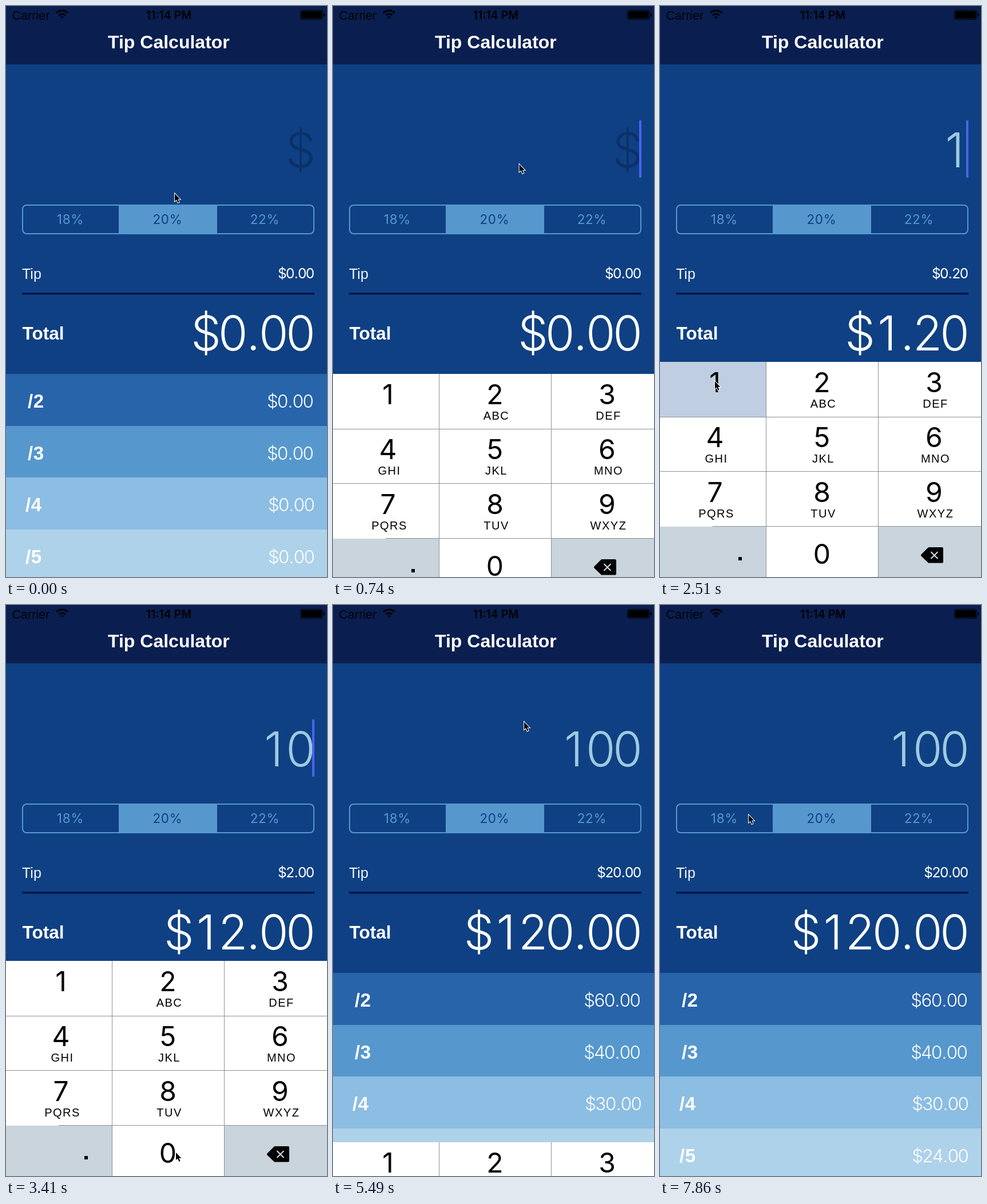
An HTML page with a canvas that plays this animation: 561x998 px, repeating every 8 s.

```html
<!DOCTYPE html>
<html lang="en">
<head>
<meta charset="utf-8">
<title>Tip Calculator</title>
<style>
  html, body { margin: 0; width: 100%; height: 100%; overflow: hidden; background: #0f4083; }
  canvas { display: block; }
</style>
</head>
<body>
<canvas id="stage" width="561" height="998"></canvas>
<script>
const ctx = document.getElementById('stage').getContext('2d');
const LOOP = 8000, STEP = 148.15;
const SANS = '"Liberation Sans", Arial, sans-serif';
const LIGHT = 'Inter, Roboto, sans-serif';
const NAVY = '#0a1f50', BLUE = '#0f4083', SKY = '#5698ce', GREY = '#c9d4dc';
const ROWS = ['#2864aa', SKY, '#8cbde3', '#aed2ea'];
const LETTERS = ',ABC,DEF,GHI,JKL,MNO,PQRS,TUV,WXYZ'.split(',');
const KEY_X = [96, 283, 479], KEY_W = 196, KEY_H = 96;
const KEYBOARD_TOP = 622, KEYBOARD_H = 376;
const SHOW = 358, FOCUS = 440, HIDE = 5200, PRESS = 150;

const TAPS = [
  { digit: 1, down: 2450, typed: 2450 },
  { digit: 0, down: 2950, typed: 3100 },
  { digit: 0, down: 3250, typed: 3550 }
];

// Where the pointer turns or rests: [time, x, y]
const STOPS = [
  [0, 295, 328], [592, 326, 273], [1332, 323, 310], [2368, 96, 656],
  [2516, 96, 656], [2960, 297, 957], [3700, 297, 957], [4588, 343, 435],
  [5330, 340, 155], [6068, 282, 641], [7104, 270, 842], [7844, 155, 367]
];
const SWIRL = 6068, SWIRL_END = 7104;

const clamp = v => Math.min(1, Math.max(0, v));
const smooth = k => k * k * (3 - 2 * k);
const mix = (a, b, k) => a + (b - a) * k;

// Share of a keyboard slide done after some ms
function settle(ms) {
  const x = Math.max(0, ms) * 0.012;
  return 1 - (1 + x) * Math.exp(-x);
}

function rect(x, y, w, h, color) {
  ctx.fillStyle = color;
  ctx.fillRect(x, y, w, h);
}

function outline(path, color, width) {
  ctx.strokeStyle = color;
  ctx.lineWidth = width;
  ctx.stroke(path);
}

function text(str, x, y, font, color, align = 'left', spacing = 0) {
  ctx.font = font;
  ctx.fillStyle = color;
  ctx.textAlign = align;
  ctx.letterSpacing = spacing + 'px';
  ctx.fillText(str, x, y);
}

// Light figures in even columns, set from the right edge
function figures(str, right, y, em, weight, color) {
  for (const ch of [...str].reverse()) {
    const w = em * (ch === '.' ? 0.278 : 0.556);
    text(ch, right - w / 2, y, `${weight} ${em * 0.98}px ${LIGHT}`, color, 'center');
    right -= w;
  }
}

function money(value, ...place) {
  figures('$' + value.toFixed(2), ...place);
}

function header() {
  rect(0, 0, 561, 102, NAVY);
  text('Carrier', 10.5, 23.5, `21.5px ${SANS}`, '#000');
  text('11:14 PM', 284.5, 23, `600 19.5px ${LIGHT}`, '#000', 'center');
  text('Tip Calculator', 178, 74, `bold 32px ${SANS}`, '#fff');

  for (const r of [2.5, 8, 14]) {
    const arc = new Path2D();
    arc.arc(98, 22, r, -Math.PI * 0.75, -Math.PI * 0.25);
    outline(arc, '#000', 3);
  }
  const battery = new Path2D();
  battery.roundRect(514.5, 7.5, 39, 16, 3);
  outline(battery, '#000', 1);
  rect(516, 9, 36, 13, '#000');
  rect(555, 13, 2, 5, '#000');
}

function segments() {
  rect(197, 348, 172, 50, SKY);
  const frame = new Path2D();
  frame.roundRect(29, 348, 509, 50, 7);
  outline(frame, SKY, 2);
  ['18%', '20%', '22%'].forEach((label, i) =>
    text(label, 112.5 + i * 170, 381, `22.5px ${LIGHT}`, i === 1 ? BLUE : SKY, 'center', 0.7));
}

function bill(typed, caret) {
  const amount = Number(typed), tip = amount * 0.2, total = amount + tip;
  figures(typed || '$', 538.5, 282, 85, 300, typed ? '#9ecae1' : '#0b3169');
  if (caret) rect(535, 200, 4, 100, '#4a63ee');
  segments();
  text('Tip', 28, 477, `25px ${SANS}`, '#f4f8fc');
  money(tip, 538.5, 476, 25, 400, '#fff');
  rect(28, 501, 511, 3.5, '#05164a');
  text('Total', 28.5, 583, `bold 31.5px ${SANS}`, '#fff');
  money(total, 538.5, 602, 85, 300, '#fff');
  ROWS.forEach((color, i) => {
    const y = Math.round(643 + i * 90.5), shift = i > 1 ? 1 : 0;
    rect(0, y, 561, 91, color);
    text('/' + (i + 2), 38 - shift * 4, y + 59, `bold 33px ${SANS}`, '#fff', 'left', 0.5);
    money(total / (i + 2), 537 + shift * 2, y + 59, 32, 300, '#fff');
  });
}

function backspace() {
  const key = new Path2D('M458 338L470 326H493V349.5H470Z');
  ctx.lineJoin = 'round';
  ctx.fillStyle = '#000';
  ctx.fill(key);
  outline(key, '#000', 4);
  outline(new Path2D('M473.5 332l12 12m0-12l-12 12'), GREY, 2.2);
}

function keyboard(tap) {
  const line = '#8d9195', digitFont = `48px ${LIGHT}`;
  rect(0, 0, 561, KEYBOARD_H, '#fff');
  rect(0, 288, 186, 88, GREY);
  rect(381, 288, 180, 88, GREY);
  if (tap) {
    const cell = (tap.digit + 10) % 11;
    rect(cell % 3 * KEY_W - 10, Math.floor(cell / 3) * KEY_H, KEY_W, KEY_H, '#c0cee2');
  }
  for (const x of [185, 381]) rect(x, 0, 1, KEYBOARD_H, line);
  for (const y of [96, 191]) rect(0, y, 561, 1, line);
  rect(92, 287, 469, 1, line);

  LETTERS.forEach((letters, i) => {
    const x = KEY_X[i % 3], y = Math.floor(i / 3) * KEY_H;
    text(i + 1, x, y + 53, digitFont, '#000', 'center');
    text(letters, x + 2.5, y + 80, `20px ${SANS}`, '#000', 'center', 1.5);
  });
  text('0', KEY_X[1], 353, digitFont, '#000', 'center');
  rect(137, 341, 6, 6, '#000');
  backspace();
}

function pointer(t) {
  const next = STOPS.findIndex(stop => stop[0] > t);
  const b = STOPS.at(next), a = STOPS.at(next - 1);
  const k = next < 0 ? 1 : smooth((t - a[0]) / (b[0] - a[0]));
  const p = clamp((t - SWIRL) / (SWIRL_END - SWIRL));
  const arrow = new Path2D('M0 0V13L3 10.5L5.5 16L7.5 15L5.2 9.8H9.3Z');
  ctx.save();
  ctx.translate(
    mix(a[1], b[1], k) + 40 * Math.sin(2 * Math.PI * p),
    mix(a[2], b[2], k) + 140 * Math.sin(Math.PI * p));
  outline(arrow, '#fff', 2);
  ctx.fillStyle = '#000';
  ctx.fill(arrow);
  ctx.restore();
}

function draw(now) {
  const t = Math.floor((now % LOOP + 10) / STEP) * 148;
  const done = TAPS.filter(tap => tap.typed <= t);
  const typed = done.map(tap => tap.digit).join('');
  const since = done.length ? done.at(-1).typed : FOCUS;
  const caret = t >= FOCUS && t < HIDE && (t - since) % 1010 < 540;

  rect(0, 0, 561, 998, BLUE);
  header();
  bill(typed, caret);

  const raised = settle(t - SHOW) - settle(t - HIDE);
  ctx.save();
  ctx.translate(0, Math.round(KEYBOARD_TOP + KEYBOARD_H * (1 - raised)));
  keyboard(TAPS.find(tap => t >= tap.down && t < tap.down + PRESS));
  ctx.restore();
  pointer(t);
}

const start = performance.now();
function loop() {
  draw(performance.now() - start);
  requestAnimationFrame(loop);
}
loop();
</script>
</body>
</html>
```
